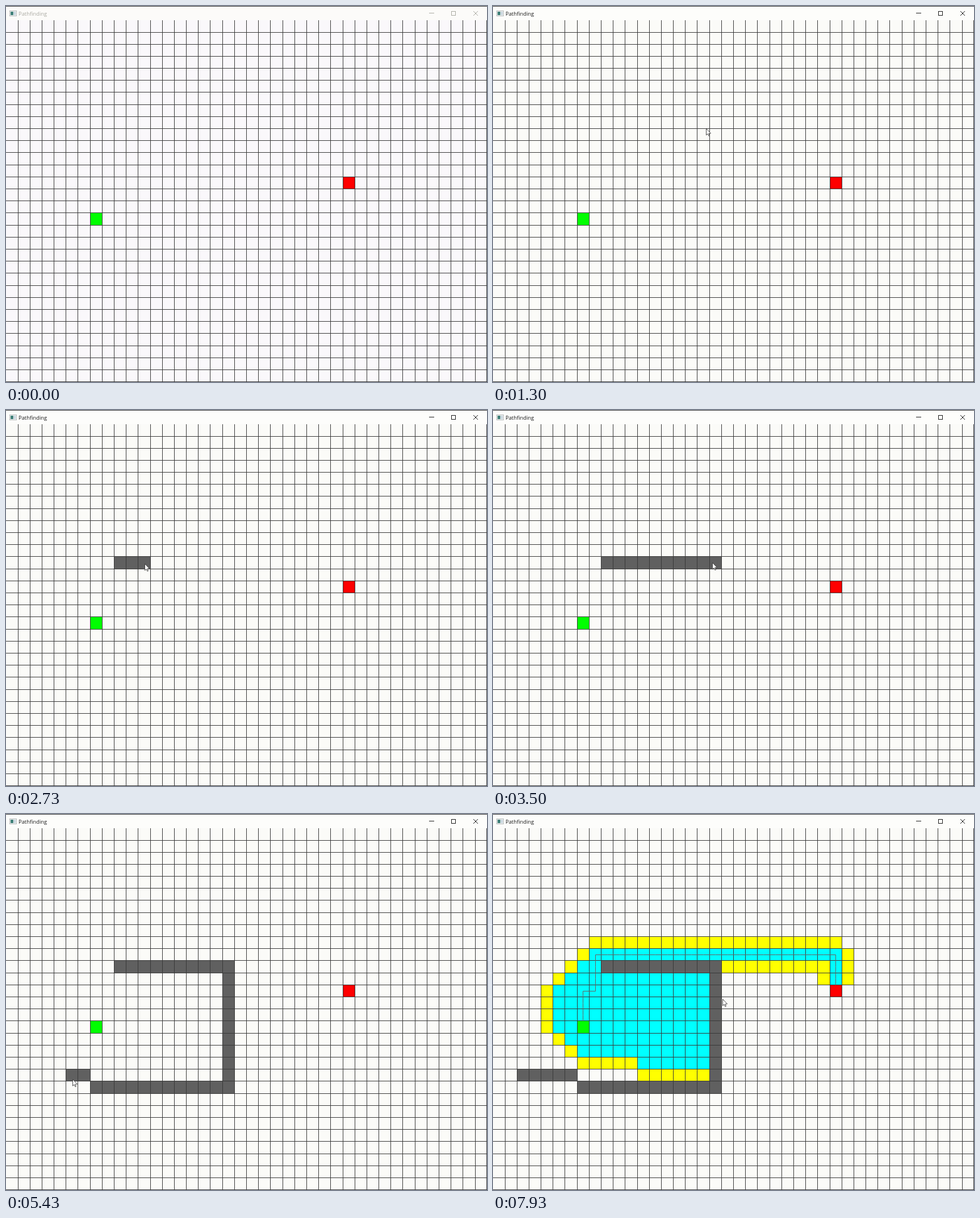
Recreate the animation shown at these times as an HTML page with a canvas. Size 847 by 661 pixels, loop 8 s.

```html
<!DOCTYPE html>
<html lang="en">
<head>
<meta charset="utf-8">
<title>Pathfinding</title>
<style>
html, body { margin: 0; width: 100%; height: 100%; overflow: hidden; background: #fbfbf8; }
canvas { display: block; width: 847px; height: 661px; }
</style>
</head>
<body>
<canvas id="stage" width="847" height="661"></canvas>
<script>
const ctx = document.getElementById('stage').getContext('2d');
const W = 847, H = 661, LOOP = 8000;
const COLS = 40, ROWS = 30, CELL_W = 21.185, CELL_H = 21.195, TOP = 25;
const ACTIVE_AT = 270, DRAW_FROM = 2500, DRAW_TO = 6500, SOLVED_AT = 7500;
const LINE = '#383838';

const start = { c: 7, r: 16 }, goal = { c: 28, r: 13 };

// Pointer key points: time, x, y
const track = [
  [470, 560, 148], [770, 508, 170], [2000, 201, 275], [2500, 201, 271],
  [3500, 386, 268], [4300, 391, 478], [5180, 150, 472], [5190, 147, 468],
  [5430, 117, 466], [6350, 57, 462], [6650, 57, 462], [7450, 404, 325]
];

const edgeX = c => Math.min(W - 1, Math.floor(c * CELL_W - 0.17));
const edgeY = r => Math.min(H - 1, Math.floor(TOP + r * CELL_H - 0.18));
const midX = c => Math.floor((c + 0.5) * CELL_W) + 0.5;
const midY = r => Math.floor(TOP + (r + 0.5) * CELL_H) + 0.5;
const keyOf = n => n.r * COLS + n.c;

function pointer(t) {
  const i = track.findIndex(p => p[0] > t);
  if (i < 0) return track[track.length - 1].slice(1);
  const a = track[Math.max(0, i - 1)], b = track[i];
  const k = i ? (t - a[0]) / (b[0] - a[0]) : 0;
  return [a[1] + (b[1] - a[1]) * k, a[2] + (b[2] - a[2]) * k];
}

// Each wall cell appears when the pressed pointer first enters it
function traceWalls() {
  const walls = new Map();
  for (let t = DRAW_FROM; t <= DRAW_TO; t += 10) {
    const [x, y] = pointer(t);
    const cell = { c: Math.floor(x / CELL_W), r: Math.floor((y - TOP) / CELL_H), t };
    if (!walls.has(keyOf(cell))) walls.set(keyOf(cell), cell);
  }
  return walls;
}

// A* with Manhattan distance; ties go to the nearer, then the upper cell
function search(walls) {
  const visit = (c, r, g, parent) =>
    ({ c, r, g, parent, h: Math.abs(goal.c - c) + Math.abs(goal.r - r) });
  const order = (a, b) => a.g + a.h - b.g - b.h || a.h - b.h || a.r - b.r;
  const open = new Map(), closed = new Map();
  open.set(keyOf(start), visit(start.c, start.r, 0, null));
  while (open.size) {
    const node = [...open.values()].sort(order)[0];
    open.delete(keyOf(node));
    if (node.h === 0) {
      const route = [];
      for (let n = node; n; n = n.parent) route.push([midX(n.c), midY(n.r)]);
      return { open, closed, route };
    }
    closed.set(keyOf(node), node);
    for (const [dc, dr] of [[0, -1], [1, 0], [0, 1], [-1, 0]]) {
      const next = visit(node.c + dc, node.r + dr, node.g + 1, node);
      const key = keyOf(next);
      const outside = next.c < 0 || next.r < 0 || next.c >= COLS || next.r >= ROWS;
      if (outside || walls.has(key) || closed.has(key)) continue;
      if (!open.has(key) || open.get(key).g > next.g) open.set(key, next);
    }
  }
}

const walls = traceWalls();
const result = search(walls);

function fillCell({ c, r }, color, inset = 0) {
  const x = edgeX(c), y = edgeY(r);
  ctx.fillStyle = color;
  ctx.fillRect(x + inset, y + inset, edgeX(c + 1) - x - inset, edgeY(r + 1) - y - inset);
}

function polyline(points, color) {
  ctx.strokeStyle = color;
  ctx.lineWidth = 1;
  ctx.beginPath();
  points.forEach(([x, y]) => ctx.lineTo(x, y));
  ctx.stroke();
}

function drawGrid() {
  ctx.fillStyle = LINE;
  for (let c = 1; c <= COLS; c++) ctx.fillRect(edgeX(c), TOP, 1, H - TOP);
  for (let r = 1; r <= ROWS; r++) ctx.fillRect(0, edgeY(r), W, 1);
}

function drawTitleBar(active) {
  const ink = active ? '#1a1a1a' : '#aaaaa2';
  const box = (x, y, w, h, color) => {
    ctx.fillStyle = color;
    ctx.fillRect(x, y, w, h);
  };
  box(0, 0, W, TOP, active ? '#fdfdfb' : '#fcfbf9');
  box(0, 0, W, 1, LINE);
  box(6, 8, 13, 10, '#b4b8b8');
  box(7, 9, 11, 8, '#f4f6f6');
  box(8, 10, 5, 6, '#3f8078');
  box(14, 10, 3, 6, '#c3d2dc');

  ctx.fillStyle = ink;
  ctx.font = '9.4px "Open Sans", "Noto Sans", sans-serif';
  ctx.fillText('Pathfinding', 22, 16.5);

  polyline([[745, 12.5], [754, 12.5]], ink);
  ctx.strokeRect(784.5, 9.5, 7, 7);
  polyline([[823, 9], [831, 17]], ink);
  polyline([[831, 9], [823, 17]], ink);
}

function drawPointer(x, y) {
  const shape = new Path2D('M0 0V11.5L2.6 9.2L4.4 13L6 12.3L4.4 8.6L8 8.4Z');
  ctx.save();
  ctx.translate(Math.round(x) + 0.5, Math.round(y) + 0.5);
  ctx.fillStyle = '#fff';
  ctx.fill(shape);
  ctx.strokeStyle = LINE;
  ctx.lineWidth = 0.9;
  ctx.stroke(shape);
  ctx.restore();
}

function draw(t) {
  const active = t >= ACTIVE_AT, solved = t >= SOLVED_AT;
  ctx.fillStyle = active ? '#fbfbf8' : '#faf8fb';
  ctx.fillRect(0, 0, W, H);

  if (solved) {
    result.open.forEach(n => fillCell(n, '#ff0'));
    result.closed.forEach(n => fillCell(n, '#0ff'));
  }
  walls.forEach(w => { if (t >= w.t) fillCell(w, '#606060'); });
  drawGrid();
  if (solved) polyline(result.route, '#6b5f5f');
  fillCell(start, '#0f0', 1);
  fillCell(goal, '#f00', 1);

  drawTitleBar(active);
  if (t >= track[0][0]) drawPointer(...pointer(t));
}

const began = performance.now();
function tick() {
  draw((performance.now() - began) % LOOP);
  requestAnimationFrame(tick);
}
tick();
</script>
</body>
</html>
```
